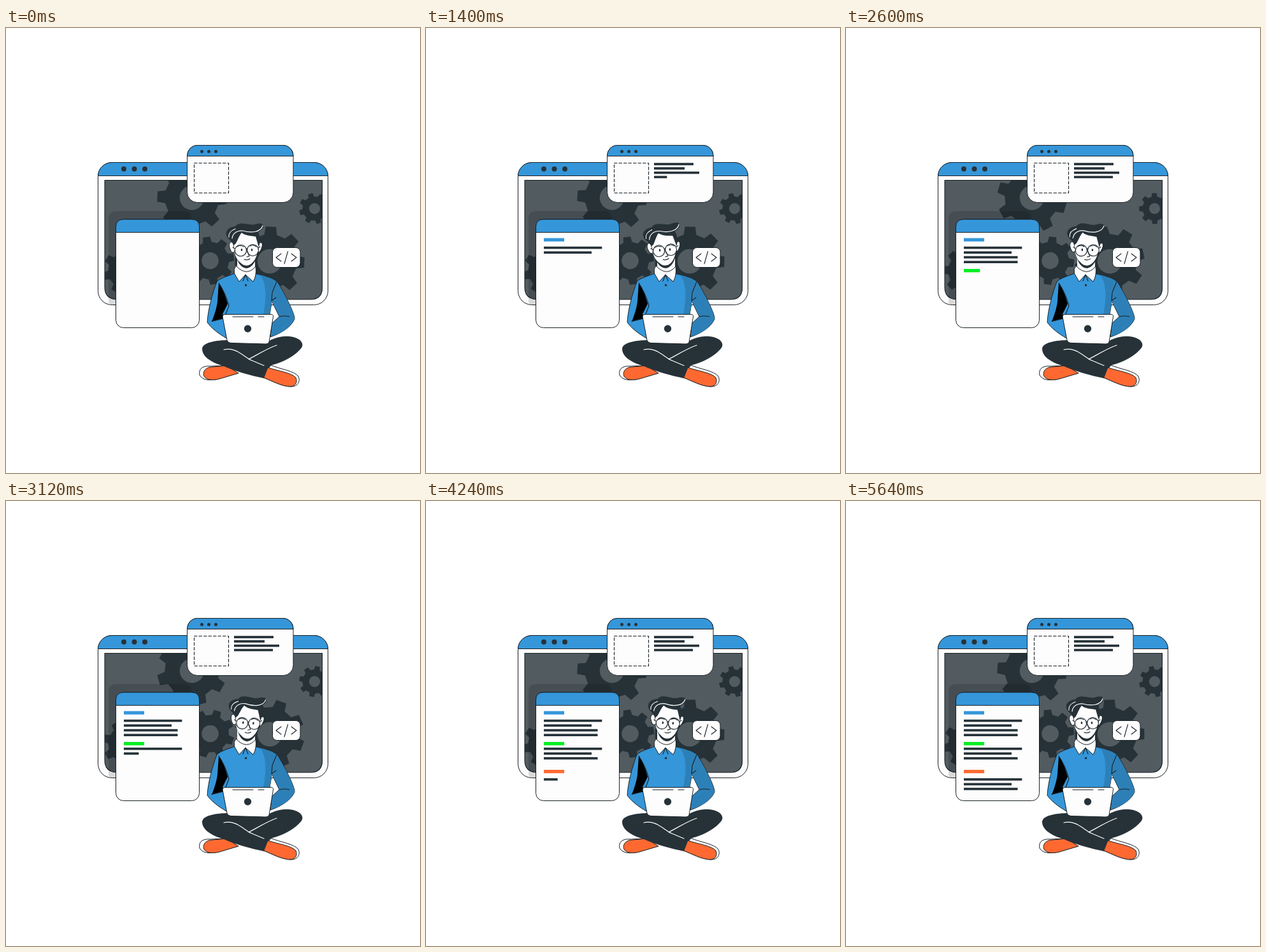
An HTML page for the animation above (5680 ms loop, 650 by 700 pixels).

```html
<!DOCTYPE html>
<html lang="en">
<head>
<meta charset="utf-8">
<title>Developer at work</title>
<style>
  html, body { margin: 0; width: 100%; height: 100%; overflow: hidden; background: #fff; }
  svg { display: block; width: 650px; height: 700px; }
  .ink { fill: #263238; }
  .blue { fill: #3596d9; }
  .shade { fill: #2d80b7; }
  .paper { fill: #fdfdfe; }
  .orange { fill: #ff6931; }
  .edge { stroke: #192125; stroke-width: 1; stroke-linejoin: round; }
  .line { fill: none; stroke: #192125; stroke-width: 1.1; stroke-linecap: round; stroke-linejoin: round; }
  .light { fill: none; stroke: #fff; stroke-width: 1.2; stroke-linecap: round; }
</style>
</head>
<body>
<svg viewBox="0 0 650 700" xmlns="http://www.w3.org/2000/svg">
  <defs>
    <clipPath id="screen"><path d="M155 239H497V409Q497 427 478 427H174Q155 427 155 408Z"/></clipPath>
  </defs>

  <g id="browser">
    <rect class="paper edge" x="144.5" y="211.5" width="361" height="224" rx="22"/>
    <path class="blue edge" d="M144.5 232.5A22 21 0 0 1 166.5 211.5H483.5A22 21 0 0 1 505.5 232.5Z"/>
    <g class="ink"><circle cx="185" cy="221.7" r="4"/><circle cx="201.5" cy="221.7" r="4"/><circle cx="218" cy="221.7" r="4"/></g>
    <g clip-path="url(#screen)">
      <rect x="155" y="239" width="342" height="189" fill="#525b60"/>
      <g id="gears"></g>
    </g>
    <path class="line" d="M155 239.5H496.5V409Q496 427 478 427H174Q155 426 155 408Z"/>
    <path d="M161 300Q161 288 173 288H279Q291 288 291 300V435.5H168Q161 435 161 430Z" opacity=".14"/>
  </g>

  <g id="card">
    <rect class="paper edge" x="284.5" y="184.5" width="166.500" height="90" rx="16"/>
    <path class="blue edge" d="M284.500 201.500A16 17 0 0 1 300.500 184.500H435A16 17 0 0 1 451 201.500Z"/>
    <g class="ink"><circle cx="307.500" cy="194.300" r="2.500"/><circle cx="318.500" cy="194.300" r="2.500"/><circle cx="329.500" cy="194.300" r="2.500"/></g>
    <rect class="line" x="295.500" y="212.500" width="54" height="47" stroke-dasharray="4.500 3"/>
  </g>

  <g id="document">
    <rect class="paper edge" x="172.500" y="301" width="131" height="170.500" rx="12"/>
    <path class="blue edge" d="M172.500 321.500V313Q172.500 301 184.500 301H291.500Q303.500 301 303.500 313V321.500Z"/>
  </g>
  <g id="bars"></g>

  <g id="bubble">
    <rect class="paper edge" x="418.500" y="345.500" width="43.500" height="31" rx="7"/>
    <path class="line" d="M432 355L424 361L432 367M448 355L456 361L448 367M442.500 351.500L437 371"/>
  </g>

  <g id="body">
    <path class="blue edge" d="M359 386C349 390 337 393 331 399C324 418 317 443 316 463C322 472 334 481 346 488L351 470L404 470L414 451C415 443 417 436 417 429L429 454L418 464L415 486C428 482 447 472 453 458C454 450 438 419 426 399C418 393 405 390 394 387Z"/>
    <path class="shade" d="M394 387C405 390 418 393 425 399C438 419 453 449 453 458C446 472 430 482 416 485L418 465L430 454L417 429C417 436 415 443 414 451H404C408 430 410 407 401 391Z"/>
    <path d="M334 401C340 409 345 422 348 434L340 450L343 457L323 462C327 452 331 440 332 430Z" fill="#000"/>
    <path class="line" d="M334 401C342 413 347 425 350 437L345 450M323 461L343 456M425 399L418 416L417 429M417 429L424 424M430 454Q436 452 445 454"/>
    <path class="paper" d="M363 357V379Q376 391 391 378V355Z"/>
    <path class="paper edge" d="M361 374Q357 379 358.500 386L366 399L376 388L388 399Q394 389 392 375Q378 392 361 374Z"/>
    <path class="line" d="M376 388L372 398M376 388L380 398"/>
    <circle class="ink" cx="376.500" cy="404.500" r="1.800"/>
  </g>

  <g id="head">
    <path class="ink" d="M359 348C361 363 366 377 378 378C389 376 394 363 398 347L397 332H356Z"/>
    <path class="paper edge" d="M357 338C351 334 349 341 352 348C354 354 357 354 359 351ZM397 339C402 335 404 340 401 347C399 352 397 354 394 352Z"/>
    <path class="ink" d="M357 342C355 334 348 333 346 326C344 317 352 313 360 312C365 305 374 308 382 309C391 311 394 306 402 308C407 313 402 318 396 321C399 328 400 336 397 344L392 330L369 324L359 342Z"/>
    <path class="paper" d="M358 341C362 341 364 329 370 322C376 327 385 327 392 328L396 342C396 354 392 365 386 370C381 375 373 375 368 369C361 364 358 354 358 341Z"/>
    <path class="light" d="M350 329C349 321 355 318 360 316M355 331C356 322 364 318 372 319C386 323 400 321 403 311"/>
    <g class="line">
      <circle cx="368.500" cy="350" r="9"/><circle cx="387.500" cy="349.500" r="9"/>
      <path d="M377 348Q378 346 379 348M359 347L356 345M396 346L399 344"/>
      <path d="M379 351L382 359L378 360M374 364Q379 366 383 363"/>
      <path d="M363 344Q368 341 373 344M383 343Q388 340 393 344"/>
    </g>
    <g class="ink"><ellipse cx="370" cy="349" rx="1.300" ry="2.100"/><ellipse cx="386" cy="349" rx="1.300" ry="2.100"/></g>
  </g>

  <g id="legs">
    <path class="paper edge" d="M320 532C308 531 302 537 304 546C309 555 321 554 329 553L364 543L345 531Z"/>
    <path class="orange edge" d="M325 533C313 533 308 541 311 548C316 555 327 554 335 552L365 543L346 531Z"/>
    <path class="paper edge" d="M415 530C431 537 452 539 459 548C463 557 457 565 446 564C431 563 418 555 405 550Z"/>
    <path class="orange edge" d="M411 534C428 540 448 542 455 550C458 557 455 564 445 564C431 563 418 555 404 550Z"/>
    <path class="ink" d="M349 491C332 491 308 494 308 505C308 518 325 527 342 532C360 540 385 547 405 551L411 535L418 530C435 526 455 515 464 503C470 493 456 484 438 485C423 486 413 491 408 497Z"/>
    <path class="light" d="M342 506C361 501 374 518 386 523L405 531M425 499C408 505 395 514 381 521"/>
  </g>

  <g id="laptop">
    <path class="paper edge" d="M344 450.500H416Q420 450.500 419.500 454L413 494Q412 497 408 497L353 495.500Q348 495 347 491L340 454Q340 450.500 344 450.500Z"/>
    <path class="line" d="M356 454.300H388M396 454.300H405"/>
    <circle class="ink" cx="379.500" cy="473" r="5.700"/>
  </g>
</svg>

<script>
const LOOP = 5680, STEP = 40, TEETH = 8;
const INK = '#263238', BLUE = '#3596d9', GREEN = '#08ee24', ORANGE = '#ff6931';
const clamp = v => Math.max(0, Math.min(1, v));

function add(parent, name, attrs) {
  const node = document.createElementNS('http://www.w3.org/2000/svg', name);
  for (const key in attrs) node.setAttribute(key, attrs[key]);
  return document.getElementById(parent).appendChild(node);
}

function gearPath(radius) {
  const points = [];
  for (let i = 0; i < TEETH; i++) {
    for (const [offset, scale] of [[-.3, .78], [-.19, 1], [.19, 1], [.3, .78]]) {
      const a = (i + offset) * 2 * Math.PI / TEETH, r = radius * scale;
      points.push((r * Math.cos(a)).toFixed(2) + ' ' + (r * Math.sin(a)).toFixed(2));
    }
  }
  const h = radius * .35;
  return `M${points.join('L')}ZM${h} 0A${h} ${h} 0 1 0 ${-h} 0A${h} ${h} 0 1 0 ${h} 0Z`;
}

// x, y, outer radius, direction, starting angle
const gears = [
  [292, 267, 55, -1, 2], [414, 367, 55, 1, 2], [320.5, 366, 38, -1, -9],
  [484.5, 284, 24.5, -1, -16], [190, 382, 38, -1, -13]
].map(([x, y, r, dir, phase]) => ({
  x, y, dir, phase,
  node: add('gears', 'path', { d: gearPath(r), fill: INK, 'fill-rule': 'evenodd' })
}));

const bars = [];
function bar(x, y, width, start, duration, fill = INK, height = 3.7) {
  bars.push({ width, start, duration, node: add('bars', 'rect', { x, y, height, fill }) });
}
[62, 48, 71, 61].forEach((w, i) => bar(358, 212.2 + i * 6.8, w, i * 400, 600));

function paragraph(y, color, titleStart, lineStarts, gap) {
  bar(185, y, 32, titleStart, 380, color, 5.3);
  lineStarts.forEach((start, i) =>
    bar(185, y + gap + i * 7.5, [91.3, 75, 84.5, 84.5][i], start, 400));
}
paragraph(330.5, BLUE, 40, [600, 1000, 1430, 1955], 13.3);
paragraph(379, GREEN, 2300, [2640, 2995, 3390], 8.9);
paragraph(422.9, ORANGE, 3750, [4145, 4550, 4980], 13.2);

// Eased head tilt between a few poses
const tilts = [[0, 0], [1200, -4.7], [3420, 4], [LOOP, 0]];
function headTilt(t) {
  const i = tilts.findIndex(([time]) => time > t);
  const [t0, a] = tilts[i - 1], [t1, b] = tilts[i];
  return a + (b - a) * (1 - Math.cos(Math.PI * (t - t0) / (t1 - t0))) / 2;
}

const head = document.getElementById('head');
function draw(t) {
  for (const g of gears) {
    const angle = g.phase + g.dir * 360 * t / LOOP;
    g.node.setAttribute('transform', `translate(${g.x} ${g.y}) rotate(${angle})`);
  }
  for (const b of bars) {
    b.node.setAttribute('width', b.width * clamp((t - b.start) / b.duration));
  }
  head.setAttribute('transform', `rotate(${headTilt(t)} 376 386)`);
}

const began = performance.now();
function tick() {
  const t = (performance.now() - began) % LOOP;
  draw(Math.floor(t / STEP) * STEP);
  requestAnimationFrame(tick);
}
tick();
</script>
</body>
</html>
```
